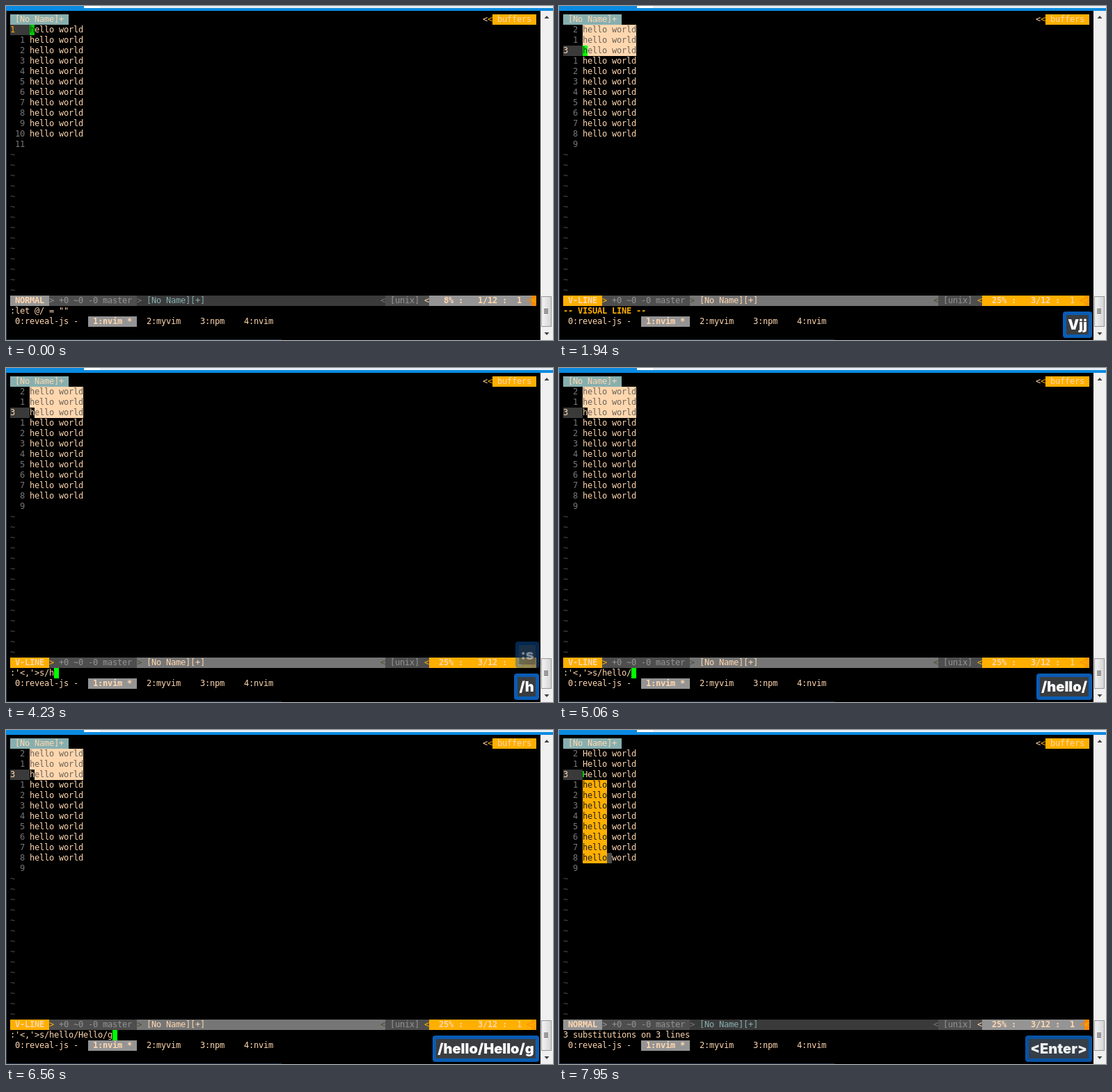
Animation, 786 px wide and 481 px high, one loop 8000 ms. Source, as an HTML page with a canvas:

```html
<!DOCTYPE html>
<html lang="en">
<head>
<meta charset="utf-8">
<title>Substitute in a visual selection</title>
<style>
html, body { margin: 0; width: 100%; height: 100%; overflow: hidden; background: #000; }
canvas { display: block; }
</style>
</head>
<body>
<canvas id="stage" width="786" height="481"></canvas>
<script>
const ctx = document.getElementById('stage').getContext('2d');
const LOOP = 8000, CW = 7, CH = 15, X0 = 6, Y0 = 12;
const MONO = '12px "DejaVu Sans Mono", monospace';
const KEYS = '900 20px Inter, "Open Sans", sans-serif';

const CREAM = '#ffd7af', ORANGE = '#ffaf00', DEEP = '#ff8700', TEAL = '#87afaf';
const G1 = '#3a3a3a', G2 = '#4e4e4e', G3 = '#767676', G4 = '#949494', LIME = '#00ff00';

// Command line as typed: [time, text]
const typed = [[2870, ":'<,'>"], [3200, ":'<,'>s"]];
const pattern = '/hello/Hello/g';
const strokes = [3810, 4060, 4290, 4510, 4680, 4840, 5060, 5380, 5610, 5690, 5860, 6010, 6310, 6560];
strokes.forEach((t, i) => typed.push([t, ":'<,'>s" + pattern.slice(0, i + 1)]));

// Key badges: when each text appears, when it moves up, when it fades
const badges = [
  { steps: [[1410, 'V'], [1710, 'Vj'], [1940, 'Vjj']], up: 2870, fade: 2720 },
  { steps: [[2870, ':'], [3200, ':s']], up: 3810, fade: 4060 },
  { steps: strokes.map((t, i) => [t, pattern.slice(0, i + 1)]), up: 7170, fade: 7340 },
  { steps: [[7170, '<Enter>']], up: LOOP, fade: 7950 }
];

const at = (steps, t) => steps.reduce((v, s) => t >= s[0] ? s[1] : v, '');

function rect(x, y, w, h, color) {
  ctx.fillStyle = color;
  ctx.fillRect(x, y, w, h);
}

function cells(col, row, n, color) {
  rect(X0 + col * CW, Y0 + row * CH, n * CW, CH, color);
}

// Writes text on the terminal grid, one glyph per cell
function put(col, row, text, fg, bg, bold) {
  if (bg) cells(col, row, text.length, bg);
  ctx.font = (bold ? 'bold ' : '') + MONO;
  ctx.fillStyle = fg;
  [...text].forEach((ch, i) => {
    if (ch !== ' ') ctx.fillText(ch, X0 + (col + i) * CW, Y0 + row * CH + 11);
  });
}

function arrow(x, y, dir) {
  ctx.fillStyle = '#404040';
  ctx.beginPath();
  ctx.moveTo(x - 3.5, y + 2 * dir);
  ctx.lineTo(x + 3.5, y + 2 * dir);
  ctx.lineTo(x, y - 2 * dir);
  ctx.fill();
}

function chrome() {
  rect(0, 0, 786, 481, '#000');
  rect(0, 0, 786, 3, '#e6eef5');
  rect(0, 0, 112, 3, '#0a8ae0');
  rect(113, 0, 22, 3, '#fff');
  rect(0, 3, 786, 4, '#0a8ae0');
  rect(0, 7, 1, 474, '#34465a');
  rect(0, 480, 396, 1, '#1c2c3c');
  rect(768, 7, 18, 474, '#f0f0f0');
  arrow(777, 16, 1);
  arrow(777, 472, -1);
  const g = ctx.createLinearGradient(769, 0, 784, 0);
  g.addColorStop(0, '#f6f6f6');
  g.addColorStop(1, '#d2d2d2');
  rect(769, 418, 15, 44, '#979797');
  rect(770, 419, 13, 42, g);
  for (let i = 0; i < 4; i++) rect(773, 436 + i * 2, 6, 1, '#505050');
}

function buffer(s) {
  put(0, 0, ' [No Name]+ ', CREAM, TEAL);
  put(97, 0, '<', CREAM);
  put(98, 0, '<', ORANGE);
  put(99, 0, ' buffers ', CREAM, ORANGE);

  for (let n = 1; n <= 12; n++) {
    const here = n === s.line;
    if (here) put(0, n, s.line + '   ', n === 1 ? ORANGE : CREAM, G1);
    else put(0, n, String(Math.abs(n - s.line)).padStart(3), G3);
    if (n === 12) break;
    if (s.done && n <= 3) put(4, n, 'Hello world', CREAM);
    else if (s.done) {
      put(4, n, 'hello', '#1c1c1c', ORANGE);
      if (n === 11) cells(9, n, 1, G2);
      put(10, n, 'world', CREAM);
    } else if (s.visual && n <= s.line) put(4, n, 'hello world', '#6c6258', CREAM);
    else put(4, n, 'hello world', CREAM);
    if (!here) continue;
    if (s.done) rect(34, Y0 + n * CH + 2, 2, 9, '#00c800');
    else if (s.cmd) put(4, n, 'h', CREAM, '#000');
    else put(4, n, 'h', s.visual ? '#303030' : '#005000', s.visual ? LIME : '#00c800');
  }
  for (let r = 13; r <= 26; r++) put(0, r, '~', G2);
}

function status(s) {
  const v = s.visual, main = v ? ORANGE : G4, mid = v ? G3 : G1;
  cells(0, 27, 108, mid);
  put(0, 27, v ? ' V-LINE ' : ' NORMAL ', CREAM, main, true);
  put(8, 27, '> +0 ~0 -0 master ', G4, G2);
  put(8, 27, '>', main, G2);
  put(26, 27, '>', v ? '#4e4e30' : G3);
  put(28, 27, '[No Name][+]', v ? CREAM : TEAL);
  put(76, 27, '<', v ? '#4e4e30' : G3);
  put(77, 27, ' [unix] ', G4, G2);
  put(85, 27, '<', v ? ORANGE : CREAM, G2);
  const pct = Math.floor(s.line / 12 * 100) + '%';
  put(86, 27, pct.padStart(5) + ' :   ' + s.line + '/12 :    ', CREAM, main, true);
  cells(103, 27, 4, main);
  put(104, 27, '1', CREAM, null, !v);
  put(106, 27, '<', DEEP);
  put(107, 27, '<', ORANGE, v ? '#ff9b00' : DEEP);
}

function footer(s) {
  if (s.cmd) {
    put(0, 28, s.cmd, CREAM);
    cells(s.cmd.length, 28, 1, LIME);
  } else if (s.visual) put(0, 28, '-- VISUAL LINE --', ORANGE, null, true);
  else put(0, 28, s.done ? '3 substitutions on 3 lines' : ':let @/ = ""', CREAM);
  put(1, 29, '0:reveal-js -', CREAM);
  put(16, 29, ' 1:nvim * ', CREAM, G4, true);
  put(28, 29, '2:myvim', CREAM);
  put(39, 29, '3:npm', CREAM);
  put(48, 29, '4:nvim', CREAM);
}

function badge(b, t) {
  const text = at(b.steps, t);
  const step = Math.floor((t - b.fade) / 75);
  const alpha = step < 0 ? 1 : 0.91 - step * 0.235;
  if (!text || alpha <= 0) return;
  ctx.save();
  ctx.globalAlpha = alpha;
  ctx.font = KEYS;
  const w = Math.round(ctx.measureText(text).width + 14.5);
  const x = 766 - w, y = t >= b.up ? 394 : 440;
  ctx.fillStyle = '#0a5cb4';
  ctx.beginPath();
  ctx.roundRect(x, y, w, 38, 4);
  ctx.fill();
  rect(x + 5, y + 5, w - 10, 28, '#3a3d40');
  ctx.textAlign = 'center';
  ctx.fillStyle = '#fff';
  ctx.fillText(text, x + w / 2, y + 26);
  ctx.restore();
}

function draw(t) {
  const s = {
    line: t < 1710 ? 1 : t < 1940 ? 2 : 3,
    visual: t >= 1410 && t < 7170,
    done: t >= 7170,
    cmd: t < 7170 ? at(typed, t) : ''
  };
  chrome();
  buffer(s);
  status(s);
  footer(s);
  badges.forEach(b => badge(b, t));
}

const start = performance.now();
function tick() {
  draw((performance.now() - start) % LOOP);
  requestAnimationFrame(tick);
}
tick();
</script>
</body>
</html>
```
